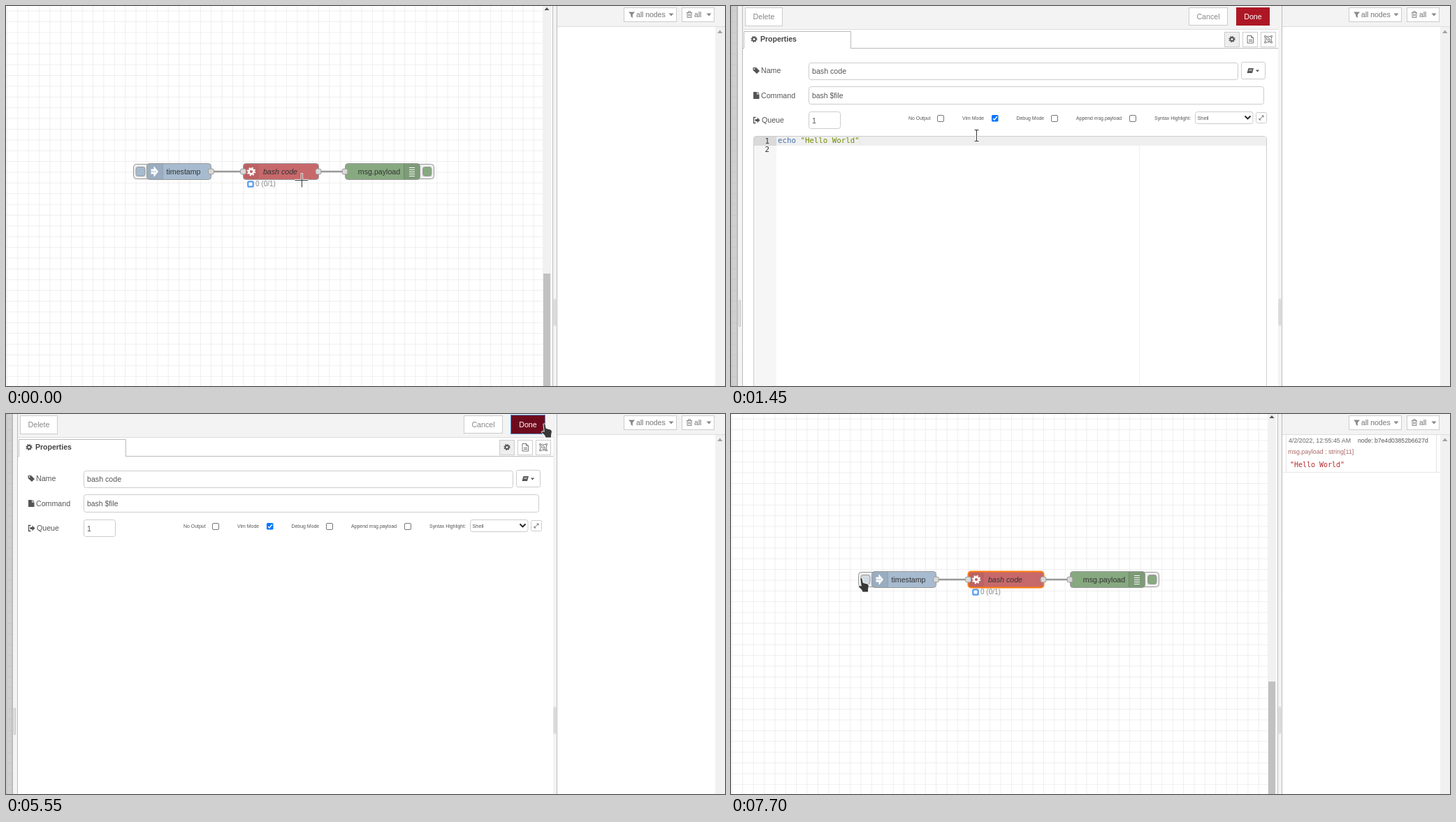
An HTML page that plays this animation: 1029x544 px, repeating every 8 s.

```html
<!DOCTYPE html>
<html lang="en">
<head>
<meta charset="utf-8">
<title>Flow editor</title>
<style>
html, body { margin: 0; width: 100%; height: 100%; overflow: hidden; background: #fff; }
svg { display: block; }
text { font: 10.65px "Liberation Sans", Arial, sans-serif; fill: #555; }
.mono { font: 10.77px "DejaVu Sans Mono", monospace; }
.tiny { font-size: 6.95px; }
.cmd { font-size: 10.4px; }
.mid { text-anchor: middle; }
.grey { fill: #888; }
.menu { font-size: 10.4px; fill: #888; stroke: #888; stroke-width: .2; }
.dark { fill: #333; }
.white { fill: #fff; }
.btn { fill: #fff; stroke: #ccc; }
.bar { fill: #f3f3f3; }
.line { stroke: #bbb; fill: none; }
.node { stroke: #999; }
.port { fill: #d9d9d9; stroke: #999; }
.wire { stroke: #999; stroke-width: 2.3; }
.ink { fill: none; stroke: #555; }

/* timed parts: 1% = 80 ms */
.t { animation: 8s step-end infinite; }
#shade { animation-name: shade; }
#tray { animation-name: tray; }
#ace { animation-name: ace; }
#pick { animation-name: pick; }
#focus { animation-name: focus; }
#done { animation-name: done; }
#ring { animation-name: ring; }
#inject { animation-name: inject; }
#msg { animation-name: msg; }
#cur { animation: move 8s linear infinite; }
#cross { animation-name: cross; }
#four { animation-name: four; }
#arrow { animation-name: arrow; }
#beam { animation-name: beam; }
#hand { animation-name: hand; }

@keyframes shade { 0%, 74.9% { visibility: hidden } 14.3% { visibility: visible } }
@keyframes tray {
  0%, 74.9% { transform: translateX(790px); }
  14.9% { transform: translateX(768px); }
  15.55% { transform: translateX(470px); }
  18.05% { transform: none; }
  69.9% { transform: translateX(70px); }
  70.55% { transform: translateX(400px); }
  71.15% { transform: translateX(630px); }
  71.8% { transform: translateX(730px); }
  72.4% { transform: translateX(766px); }
}
@keyframes ace { 0% { visibility: visible } 68.7%, 100% { visibility: hidden } }
@keyframes pick { 0% { stroke: #999; stroke-width: 1 } 11.2%, 100% { stroke: #ff7f0e; stroke-width: 2 } }
@keyframes focus { 0%, 68% { visibility: hidden } 30.5% { visibility: visible } }
@keyframes done { 0% { fill: #ad1625 } 67.4%, 100% { fill: #6e0a1e } }
@keyframes ring { 0% { visibility: hidden } 68.7%, 100% { visibility: visible } }
@keyframes inject { 0% { fill-opacity: 1 } 91.1% { fill-opacity: .4 } 93.7% { fill-opacity: .2 } 95.55%, 100% { fill-opacity: .4 } }
@keyframes msg { 0% { visibility: hidden } 95.55%, 100% { visibility: visible } }

@keyframes move {
  0%, 1.2% { transform: translate(423px, 249px) }
  3.5% { transform: translate(443px, 232px) }
  5.5% { transform: translate(426px, 221px) }
  8.1%, 18.04% { transform: translate(407px, 231px) }
  18.05%, 18.7% { transform: translate(352px, 186px) }
  23.7%, 26.2% { transform: translate(180px, 190px) }
  28.1% { transform: translate(164px, 128px) }
  31.2%, 36.8% { transform: translate(56px, 122px) }
  39.3%, 39.9% { transform: translate(234px, 134px) }
  41.2% { transform: translate(200px, 70px) }
  43% { transform: translate(110px, 66px) }
  45% { transform: translate(90px, 130px) }
  46.9% { transform: translate(150px, 205px) }
  50% { transform: translate(210px, 255px) }
  53% { transform: translate(60px, 258px) }
  55% { transform: translate(10px, 190px) }
  57.5% { transform: translate(60px, 140px) }
  60% { transform: translate(110px, 270px) }
  63% { transform: translate(300px, 220px) }
  66.5% { transform: translate(700px, 40px) }
  68.1%, 75.6% { transform: translate(771px, 15px) }
  80% { transform: translate(600px, 140px) }
  85%, 85.5% { transform: translate(352px, 282px) }
  89% { transform: translate(230px, 262px) }
  91.2%, 100% { transform: translate(187px, 236px) }
}
@keyframes cross { 0%, 75.7% { visibility: visible } 3.1%, 90.5%, 100% { visibility: hidden } }
@keyframes four { 0%, 14.3%, 100% { visibility: hidden } 3.1% { visibility: visible } }
@keyframes arrow { 0%, 18.05%, 46.2%, 57.8%, 66.8%, 75.7%, 100% { visibility: hidden } 14.3%, 38.1%, 52.9%, 62%, 71.1% { visibility: visible } }
@keyframes beam { 0%, 38.1%, 52.9%, 62%, 100% { visibility: hidden } 18.05%, 46.2%, 57.8% { visibility: visible } }
@keyframes hand { 0%, 71.1% { visibility: hidden } 66.8%, 90.5%, 100% { visibility: visible } }
</style>
</head>
<body>
<svg width="1029" height="544" viewBox="0 0 1029 544">
<defs>
  <pattern id="grid" x="0.9" y="6.7" width="15.385" height="15.385" patternUnits="userSpaceOnUse">
    <path d="M0 .4H15.4M.4 0V15.4" stroke="#ebebeb" stroke-width=".9"/>
  </pattern>
  <g id="gear" fill="none" stroke="currentColor">
    <circle r="3.4" stroke-width="2.6"/>
    <circle r="5" stroke-width="2.4" stroke-dasharray="1.963"/>
  </g>
  <path id="caret" d="M-3.5-2H3.5L0 2Z"/>
  <rect id="plug" class="port" x="-3.9" y="-3.9" width="7.8" height="7.8" rx="2.2"/>
  <rect id="grip" x="-1" y="-19" width="2" height="38" rx="1" fill="#fff" stroke="#bbb"/>
  <rect id="box" x="-4.5" y="-4.5" width="9" height="9" rx="1.5" fill="#fff" stroke="#767676"/>
</defs>

<!-- workspace -->
<rect width="768" height="544" fill="#fff"/>
<rect width="768" height="544" fill="url(#grid)"/>
<path class="wire" d="M294 237H339M447 237H485"/>

<rect class="node" x="182.5" y="226.5" width="26" height="21" rx="4" fill="#eee"/>
<rect id="inject" class="node t" x="186" y="230.5" width="13" height="13" rx="3" fill="#a6bbcf"/>
<rect class="node" x="201.5" y="225.5" width="92" height="23" rx="4" fill="#a6bbcf"/>
<path d="M202 229q0-3 3-3H224V248H205q-3 0-3-3Z" fill-opacity=".07"/>
<path d="M224.5 226V248" stroke="#000" stroke-opacity=".12"/>
<path class="white" d="M207.5 233.5H211.5V229L218 237L211.5 245V240.5H207.5Z"/>
<path d="M207 237H215" stroke="#a6bbcf"/>
<text class="mid dark" x="254" y="241">timestamp</text>

<rect id="pick" class="node t" x="339.5" y="225.5" width="108" height="23" rx="4" fill="#c7686a"/>
<path d="M340.5 229q0-2.5 3-2.5H362V247.5H343q-2.5 0-2.5-3Z" fill-opacity=".05"/>
<use href="#gear" x="351" y="237" color="#fff"/>
<text class="mid dark" x="392.5" y="241" font-style="italic" style="font-style:italic">bash code</text>
<rect x="346.3" y="251.3" width="7.4" height="7.4" rx="1.5" fill="#fff" stroke="#539bef" stroke-width="2.2"/>
<text class="grey" x="357" y="258" style="font-size:10px">0 (0/1)</text>

<rect class="node" x="587" y="226.5" width="25.5" height="21" rx="4" fill="#eee"/>
<rect class="node" x="596.5" y="230.5" width="12.5" height="13" rx="3" fill="#87a980"/>
<rect class="node" x="485.5" y="225.5" width="107" height="23" rx="4" fill="#87a980"/>
<path d="M569 226H589q3 0 3 3V245q0 3-3 3H569Z" fill-opacity=".08"/>
<path d="M569.5 226V248" stroke="#000" stroke-opacity=".12"/>
<path d="M577 231.5H585M577 234.5H585M577 237.5H585M577 240.5H585M577 243.5H585" stroke="#fff" stroke-width="1.2"/>
<text class="mid dark" x="534" y="241">msg.payload</text>
<use href="#plug" x="293.5" y="237"/><use href="#plug" x="339.5" y="237"/>
<use href="#plug" x="447" y="237"/><use href="#plug" x="485" y="237"/>

<rect x="768" width="12" height="544" fill="#f1f1f1"/>
<path d="M770.5 6H777.5L774 2Z" fill="#505050"/>
<rect x="769" y="383" width="10" height="161" fill="#c1c1c1"/>
<rect x="780" width="2" height="544" fill="#fff"/>
<rect class="bar" x="782" width="7" height="544"/>
<path class="line" d="M782.5 0V544"/>
<use href="#grip" x="785.5" y="438.5"/>
<rect id="shade" class="t" width="782" height="544" fill="#a0a0a0" fill-opacity=".5"/>

<!-- edit tray -->
<g id="tray" class="t">
  <rect x="8" width="1" height="544" fill="#aaa" fill-opacity=".5"/>
  <rect x="9" width="774" height="544" fill="#fff"/>
  <rect class="bar" x="9" width="774" height="33"/>
  <rect class="bar" x="9" width="7" height="544"/>
  <path class="line" d="M9.5 0V544M16.5 0V544"/>
  <use href="#grip" x="12.5" y="440"/>
  <path d="M17 33.5H783" stroke="#ddd"/>
  <path class="line" d="M17 60.5H18.5M171.5 60.5H783"/>
  <path d="M18.5 61V36.5H171.5V61" fill="#fff" stroke="#bbb"/>

  <rect class="btn" x="20.5" y="2.5" width="53" height="26"/>
  <text class="grey mid" x="47" y="19">Delete</text>
  <rect class="btn" x="655.5" y="2.5" width="55" height="25"/>
  <text class="grey mid" x="683" y="18.5">Cancel</text>
  <rect id="done" class="t" x="723" y="2" width="48" height="26"/>
  <rect id="ring" class="t" x="722.5" y="1.5" width="49" height="27" fill="none" stroke="#5b8fd0"/>
  <text class="mid white" x="747" y="18.5">Done</text>

  <use href="#gear" transform="translate(33 47.5) scale(.75)" color="#555"/>
  <text x="42" y="51" style="font-weight:bold;font-size:10.5px;fill:#444">Properties</text>
  <rect class="btn" x="706.5" y="37.5" width="21" height="21" style="fill:#eee"/>
  <use href="#gear" transform="translate(717 47.5) scale(.75)" color="#555"/>
  <rect class="btn" x="732.5" y="37.5" width="21" height="21"/>
  <path class="ink" stroke-width=".8" d="M739 42.5H744.5L747.5 45.5V53H739ZM744.5 42.5V45.5H747.5M741 48.5H746M741 50.5H746"/>
  <rect class="btn" x="758.5" y="37.5" width="21" height="21"/>
  <path class="ink" stroke-width=".7" d="M764.5 43.5H773.5V52H764.5ZM766.5 45.5H770V48.5H766.5ZM771.5 47V50.5H768"/>
  <path class="ink" fill="#fff" stroke-width=".6" style="fill:#fff" d="M763.5 42.5h2v2h-2ZM772.5 42.5h2v2h-2ZM763.5 51h2v2h-2ZM772.5 51h2v2h-2Z"/>

  <path d="M31.5 88H36L41 93L37 97L31.5 92Z" fill="#555"/><circle cx="33.5" cy="90" r=".9" fill="#fff"/>
  <text x="43" y="96">Name</text>
  <rect class="btn" x="111.5" y="81.5" width="614" height="24" rx="3"/>
  <text x="116" y="97">bash code</text>
  <rect class="btn" x="730.5" y="80.5" width="34" height="24" rx="2"/>
  <path d="M740.5 89H748L746 96H738.5Z" fill="#555"/><path d="M741.5 91H746M741 92.5H745.5" stroke="#fff" stroke-width=".6"/>
  <use href="#caret" transform="translate(753.5 93) scale(.75)" fill="#555"/>

  <path d="M32 123H37V126.5H40.5V133H32ZM37.8 122.8L40.6 125.6H37.8Z" fill="#555"/>
  <text x="43" y="132">Command</text>
  <rect class="btn" x="111.5" y="115.5" width="651" height="25" rx="3"/>
  <text class="cmd" x="116" y="132">bash $file</text>
  <g id="focus" class="t">
    <rect x="111.5" y="115.5" width="651" height="25" rx="3" fill="none" stroke="#66a6e6"/>
    <rect x="116" y="122" width="44" height="13" fill="#3daee9"/>
    <text class="cmd white" x="116" y="132">bash $file</text>
  </g>

  <path class="ink" d="M35.5 159.5H32.5V167.5H35.5" stroke-width="1.3"/>
  <path d="M34.5 162H37.5V159.5L41.5 163.5L37.5 167.5V165H34.5Z" fill="#555"/>
  <text x="44" y="167">Queue</text>
  <rect class="btn" x="111.5" y="151.5" width="45" height="24" rx="3"/>
  <text x="116" y="168">1</text>

  <text class="tiny" x="254" y="162.5">No Output</text><use href="#box" x="300" y="161"/>
  <text class="tiny" x="331" y="162.5">Vim Mode</text>
  <rect x="373" y="156" width="9.5" height="9.5" rx="1.5" fill="#0075ff"/>
  <path d="M375 161L377 163L380.8 158.3" fill="none" stroke="#fff" stroke-width="1.5"/>
  <text class="tiny" x="408.5" y="162.5">Debug Mode</text><use href="#box" x="463" y="161"/>
  <text class="tiny" x="494" y="162.5">Append msg.payload</text><use href="#box" x="575" y="161"/>
  <text class="tiny" x="606" y="162.5">Syntax Highlight:</text>
  <rect class="btn" x="664.5" y="151.5" width="82.5" height="17" rx="3"/>
  <text x="667.5" y="163" style="font-size:7.3px">Shell</text>
  <path d="M735.5 157.5L739.5 161.5L743.5 157.5" fill="none" stroke="#222" stroke-width="1.8"/>
  <rect class="btn" x="751.5" y="152.5" width="15" height="15" rx="2"/>
  <path class="ink" d="M756 163L762 157M759.5 157H762V159.5M756 160.5V163H758.5" stroke-width=".8"/>

  <g id="ace" class="t">
    <rect x="32.5" y="186.5" width="734" height="370" rx="3" fill="#fff" stroke="#ccc"/>
    <rect x="33" y="187" width="32" height="360" fill="#f6f6f6"/>
    <rect x="33" y="187" width="32" height="13" fill="#dadada"/>
    <rect x="65" y="187" width="701" height="13" fill="#efefef"/>
    <path d="M584.5 187V544" stroke="#f0f0f0"/>
    <path d="M184.5 187V199" stroke="#e4e4e4"/>
    <text class="mono dark" x="48.5" y="196.5">1</text>
    <text class="mono dark" x="48.5" y="209">2</text>
    <text class="mono" x="67" y="196" style="fill:#4271ae">echo <tspan fill="#718c00">"Hello World"</tspan></text>
  </g>
</g>

<!-- sidebar -->
<rect x="789" width="240" height="544" fill="#fff"/>
<rect class="bar" x="789" width="240" height="29"/>
<path d="M789 29.5H1029" stroke="#ddd"/>
<path class="line" d="M788.5 0V544"/>
<rect x="1015" y="30" width="14" height="514" fill="#f1f1f1"/>
<path d="M1018 39H1025.5L1021.75 34.5Z" fill="#a3a3a3"/>
<rect class="btn" x="884.5" y="2.5" width="75" height="20"/>
<path class="grey" d="M891 8.5H900L896.8 12.3V17L894.2 15V12.3Z"/>
<text class="menu" x="902" y="16">all nodes</text>
<use href="#caret" x="952" y="12.5" class="grey"/>
<rect class="btn" x="967.5" y="2.5" width="46" height="20"/>
<path class="ink" style="stroke:#888" d="M974 9.5H982M976.5 9V7.8H979.5V9M975 10V16.5H981V10M977 11V15M979 11V15"/>
<text class="menu" x="985" y="16">all</text>
<use href="#caret" x="1006" y="12.5" class="grey"/>

<g id="msg" class="t">
  <path d="M794.5 30V83M1009.5 30V83" stroke="#e2e2e2"/>
  <path d="M790 83.5H1015" stroke="#e6e6e6"/>
  <text x="798" y="41" style="font-size:8.85px;fill:#666">4/2/2022, 12:55:45 AM</text>
  <text x="897" y="41" style="font-size:8.65px">node: b7e4d03852b6627d</text>
  <text x="797" y="56.5" style="font-size:8.95px;fill:#a66">msg.payload : string[11]</text>
  <text class="mono" x="800" y="76" style="font-size:9.97px;fill:#b72828">"Hello World"</text>
</g>

<!-- pointers, drawn around their hot spot -->
<g id="cur">
  <g id="cross" class="t">
    <path d="M-10 .5H10M.5-10V11" stroke="#fff" stroke-width="3"/>
    <path d="M-9.5 .5H9.5M.5-9.5V10.5" stroke="#333"/>
  </g>
  <path id="four" class="t" d="M0-11L4-7H1.3V-1.3H7V-4L11 0L7 4V1.3H1.3V7H4L0 11L-4 7H-1.3V1.3H-7V4L-11 0L-7-4V-1.3H-1.3V-7H-4Z" fill="#333" stroke="#fff" stroke-width=".9"/>
  <path id="arrow" class="t" d="M.3 0V15.5L3.8 13L6.5 18.5L9.3 17.2L6.8 11.8L10.5 10.5Z" fill="#383838" stroke="#fff" stroke-width=".9"/>
  <g id="beam" class="t" fill="none">
    <path d="M-3.5-8.5H2.5M-.5-8.5V7.5M-3.5 7.5H2.5" stroke="#fff" stroke-width="3"/>
    <path d="M-3.5-8.5H2.5M-.5-8.5V7.5M-3.5 7.5H2.5" stroke="#333"/>
  </g>
  <path id="hand" class="t" d="M-2.2-.5Q-.7-2.3 .8-.5L2.2 5.5L8 7Q10.5 8 10.3 10.5L9.5 15V19H1.2L-.3 15.5L-4.3 11.5Q-4.8 9.5-2.8 9.3L-.8 10.2Z" fill="#383838" stroke="#fff" stroke-width=".9"/>
</g>
</svg>
</body>
</html>
```
